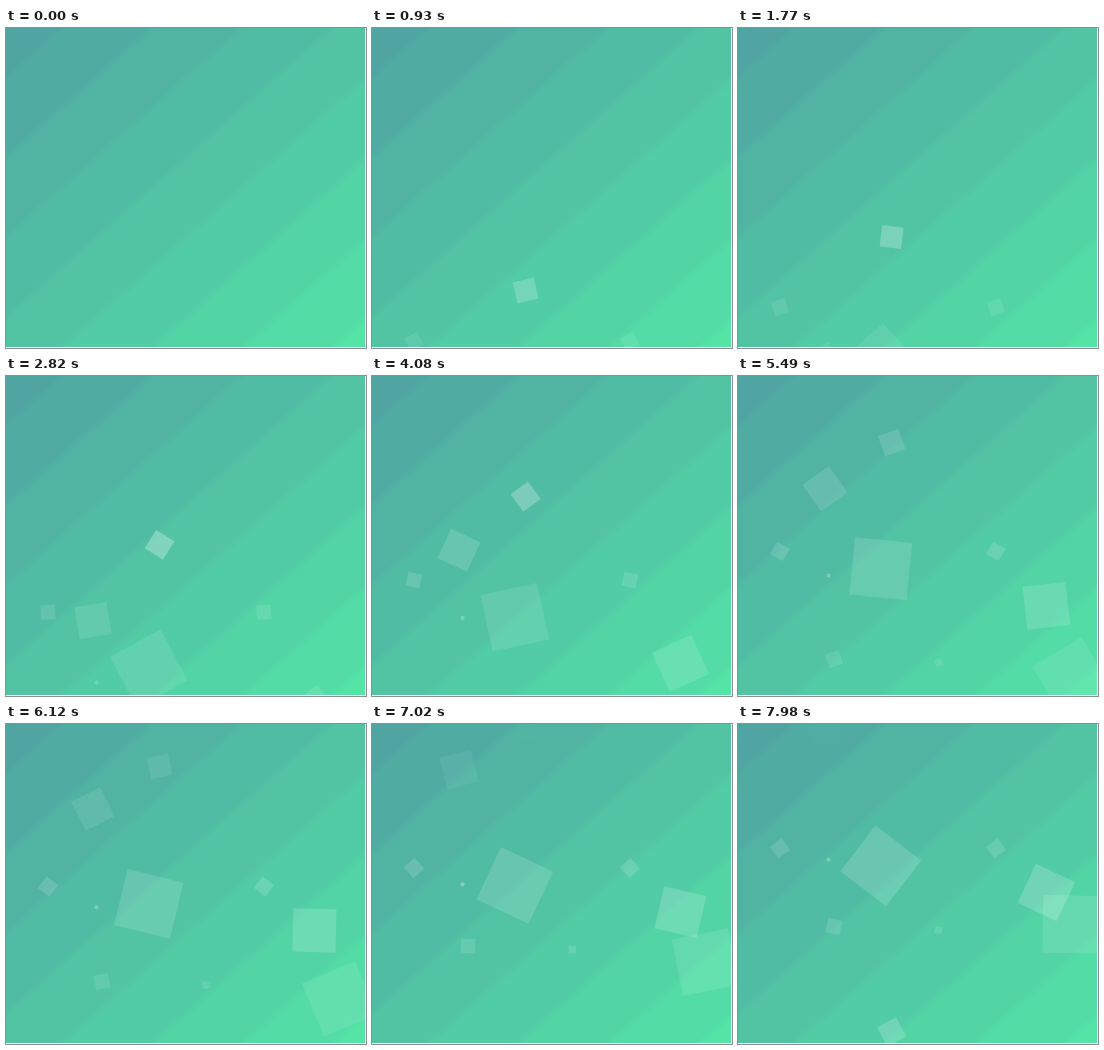
An HTML page with a canvas for the animation above (8000 ms loop, 360 px wide and 320 px high).

```html
<!DOCTYPE html>
<html lang="en">
<head>
<meta charset="utf-8">
<title>Rising squares</title>
<style>
  html, body { margin: 0; width: 100%; height: 100%; overflow: hidden; background: #fff; }
  canvas { display: block; }
</style>
</head>
<body>
<canvas id="stage" width="360" height="320"></canvas>
<script>
const W = 360, H = 320, LOOP = 8000;
const SCALE = 0.36, FLOOR = 374.6, SHIFT = -1.2;
const LEAD = 390, STEP = 955, SECOND = 940; // ms: head start, delay unit, rise unit
const ctx = document.getElementById('stage').getContext('2d');

const base = { size: 40, delay: 0, secs: 15, alpha: 0.15 };
const squares = [
  { left: 0.1 },
  { left: 0.2, size: 90, delay: 2, secs: 7 },
  { left: 0.25, delay: 4 },
  { left: 0.4, size: 60, secs: 8, alpha: 0.3 },
  { left: 0.7 },
  { left: 0.8, size: 120, delay: 3, alpha: 0.2 },
  { left: 0.32, size: 160, delay: 2 },
  { left: 0.55, size: 20, delay: 4 },
  { left: 0.25, size: 10, delay: 2, secs: 12, alpha: 0.3 },
  { left: 0.85, size: 160, delay: 5 }
].map(sq => ({ ...base, ...sq }));

const mix = (a, b, t) => a + (b - a) * t;

// Rise is twice as fast in the first quarter, spin in the first half
const riseAt = p => p < 0.25 ? 1600 * p : 200 + 800 * p;
const angleAt = p => p < 0.5 ? 45 + 180 * p : 90 + 90 * p;
const opacityAt = p => p < 0.5 ? 0.5 + p : 2 - 2 * p;

// Diagonal gradient in soft bands
function makeBackdrop() {
  const span = 720, first = 56, step = 90, soft = 6;
  const k = span / (1 + (W / H) ** 2);
  const g = ctx.createLinearGradient(0, 0, k, k * W / H);
  for (let to = first; to < span + step; to += step) {
    const from = to - step;
    const t = (from + to) / 2 / span;
    const color = `rgb(${mix(80, 83, t)}, ${mix(163, 227, t)}, ${mix(162, 166, t)})`;
    g.addColorStop(Math.max(0, (from + soft) / span), color);
    g.addColorStop(Math.min(1, (to - soft) / span), color);
  }
  return g;
}

const backdrop = makeBackdrop();

function drawSquare({ left, size, secs, alpha }, p) {
  const s = size * SCALE;
  ctx.save();
  ctx.translate(left * W + SHIFT + s / 2, FLOOR - riseAt(p) * SCALE - s / 2);
  ctx.rotate(angleAt(p) * Math.PI / 180);
  ctx.fillStyle = `rgba(255, 255, 255, ${alpha * opacityAt(p)})`;
  ctx.fillRect(-s / 2, -s / 2, s, s);
  ctx.restore();
}

function draw(time) {
  ctx.fillStyle = backdrop;
  ctx.fillRect(0, 0, W, H);
  for (const sq of squares) {
    const age = time + LEAD - sq.delay * STEP;
    if (age < 0) continue;
    const p = age % (sq.secs * STEP) / (sq.secs * SECOND);
    if (p < 1) drawSquare(sq, p);
  }
  // Pale right and bottom edge
  ctx.fillStyle = '#fff';
  ctx.fillRect(W - 1, 0, 1, H);
  ctx.fillRect(0, H - 1, W, 1);
}

const origin = performance.now();
function tick() {
  draw((performance.now() - origin) % LOOP);
  requestAnimationFrame(tick);
}
tick();
</script>
</body>
</html>
```
